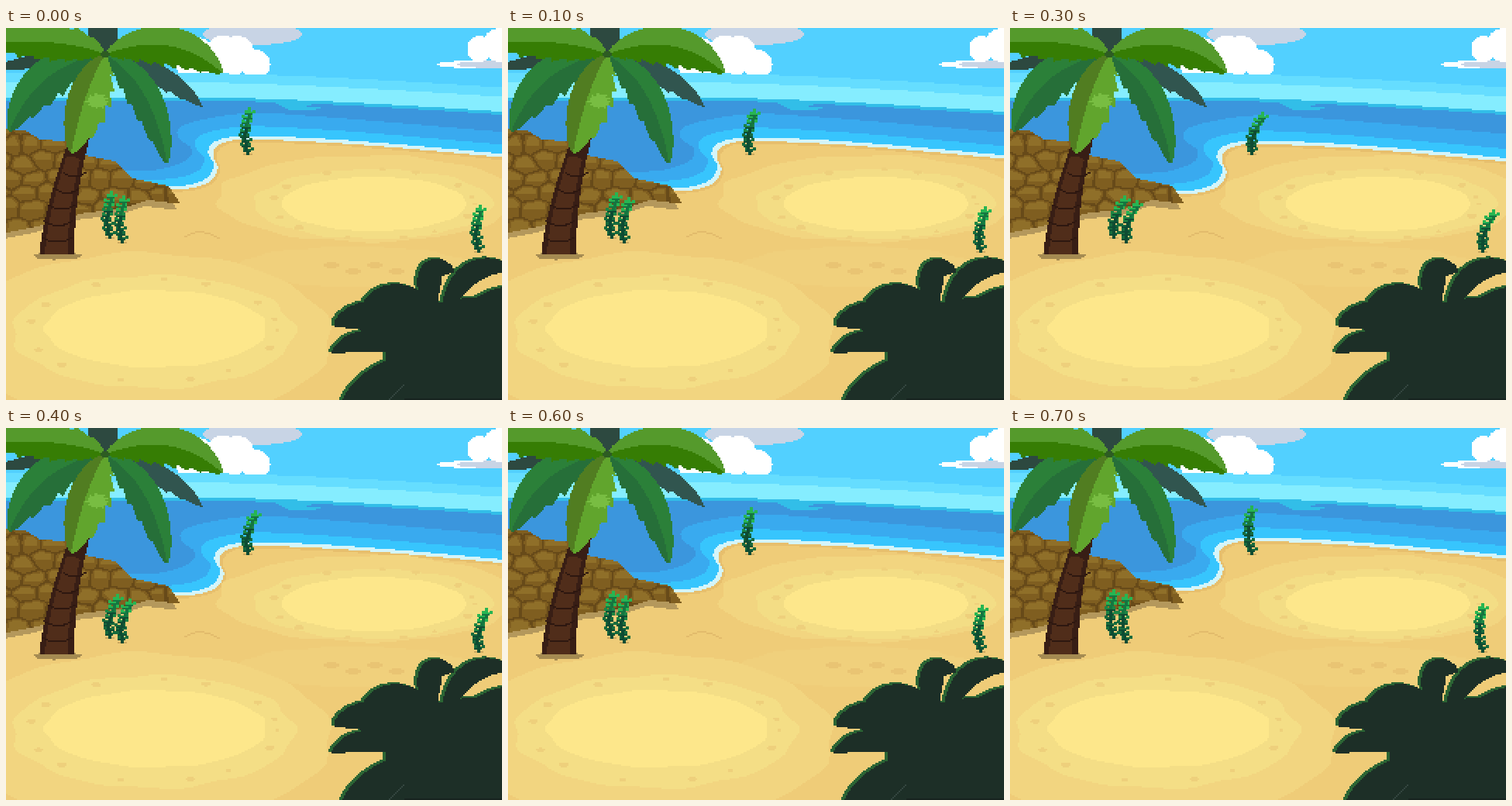
Animation, 640 px wide and 480 px high, one loop 0.8 s. Source, as an HTML page with a canvas:

```html
<!DOCTYPE html>
<html lang="en">
<head>
<meta charset="utf-8">
<title>Beach</title>
<style>
  html, body { margin: 0; height: 100%; overflow: hidden; }
  canvas { display: block; width: 100vw; height: 100vh; image-rendering: pixelated; }
</style>
</head>
<body>
<canvas width="320" height="240"></canvas>
<script>
const W = 320, H = 240;
const screen = document.querySelector('canvas').getContext('2d');
let ctx = screen;

let seed = 7;
const rand = (a, b) => a + (b - a) * ((seed = seed * 16807 % 2147483647) / 2147483647);

function rect(color, x, y, w, h) {
  ctx.fillStyle = color;
  ctx.fillRect(x, y, w, h);
}

// Scanline fill without antialiasing. Shapes use stage units, two per canvas pixel.
// The colour may be a function of the pixel.
function fill(color, p, dx = 0, dy = 0) {
  for (let y = 0; y < H; y++) {
    const cy = y * 2 + 1 - dy, xs = [];
    p.forEach(([x1, y1], i) => {
      const [x2, y2] = p[(i + 1) % p.length];
      if (y1 > cy !== y2 > cy) xs.push(Math.round((x1 + (cy - y1) / (y2 - y1) * (x2 - x1) + dx) / 2));
    });
    xs.sort((a, b) => a - b);
    for (let i = 0; i + 1 < xs.length; i += 2) {
      if (typeof color === 'string') rect(color, xs[i], y, xs[i + 1] - xs[i], 1);
      else for (let x = xs[i]; x < xs[i + 1]; x++) rect(color(x * 2, y * 2), x, y, 1, 1);
    }
  }
}

function smooth(p) {
  const out = [], n = p.length;
  for (let i = 0; i < n; i++) {
    const [a, b, c, d] = [-1, 0, 1, 2].map(k => p[(i + k + n) % n]);
    for (let t = 0; t < 1; t += 0.125) {
      out.push([0, 1].map(k => b[k] + t / 2 * (c[k] - a[k] +
        t * (2 * a[k] - 5 * b[k] + 4 * c[k] - d[k] + t * (3 * (b[k] - c[k]) + d[k] - a[k])))));
    }
  }
  return out;
}

function blob(color, x, y, rx, ry, wobble = 0) {
  const p = [];
  for (let a = 0; a < 2 * Math.PI; a += 0.1) {
    const r = 1 + wobble * (Math.sin(a * 9 + x) + Math.sin(a * 13 + y));
    p.push([x + rx * r * Math.cos(a), y + ry * r * Math.sin(a)]);
  }
  fill(color, p);
}

// A band along a quadratic curve, reaching left(t) and right(t) to its sides
function strip(color, [x0, y0], [x1, y1], [x2, y2], left, right) {
  const a = [], b = [];
  for (let i = 0; i <= 80; i++) {
    const t = i / 80, s = 1 - t;
    const x = s * s * x0 + 2 * s * t * x1 + t * t * x2, y = s * s * y0 + 2 * s * t * y1 + t * t * y2;
    const dx = s * (x1 - x0) + t * (x2 - x1), dy = s * (y1 - y0) + t * (y2 - y1), n = Math.hypot(dx, dy);
    a.push([x + dy / n * left(t), y - dx / n * left(t)]);
    b.unshift([x - dy / n * right(t), y + dx / n * right(t)]);
  }
  fill(color, a.concat(b));
}

const none = () => 0;
const bulge = w => t => w * Math.sin(Math.PI * t) ** 0.65;
const jagged = (w, teeth = 6) => t => bulge(w)(t) * (0.8 + 0.25 * (t * teeth % 1));

function leaf(from, ctrl, tip, leftColor, left, rightColor, right) {
  strip(leftColor, from, ctrl, tip, left, none);
  strip(rightColor, from, ctrl, tip, none, right);
}

function sky() {
  rect('#52d0ff', 0, 0, W, H);
  blob('#c8d4e5', 318, 8, 64, 14);
  blob('#c8d4e5', 312, 67, 94, 5);
  for (const [x, y, r] of [[245, 40, 28], [280, 30, 21], [298, 32, 22], [322, 47, 19], [290, 48, 16]]) blob('#fff', x, y, r, r);
  blob('#fff', 612, 47, 56, 5);
  blob('#c8d4e5', 640, 47, 58, 5);
  blob('#fff', 611, 27, 16, 17);
  blob('#fff', 640, 22, 26, 22);
  for (let x = 0; x < W; x++) {
    const y = 88 + 19 * Math.max(0, (x * 2 - 230) / 410) ** 1.5;
    [['#65ddff', -30], ['#85edff', -18], ['#32bee8', 1], ['#3b96dd', 5]].forEach(([color, d]) =>
      rect(color, x, Math.round((y + d) / 2), 1, H));
  }
  for (let i = 0; i < 5; i++) rect('#32bee8', 174 + i * 2, 48 + i, 14 + i * 7 % 12, 1);
}

// Matching points of the deep water's edge and the sand's edge; the bands lie between
const deep = [[180, 184], [212, 179], [236, 168], [238, 154], [222, 141], [232, 124], [310, 110], [400, 114], [500, 122], [640, 134], [760, 144]];
const dry = [[180, 207], [228, 208], [261, 199], [273, 181], [267, 164], [276, 150], [308, 144], [400, 147], [500, 154], [640, 167], [760, 179]];

function shore(color, q, tide) {
  const edge = deep.map(([x, y], i) => [x + (dry[i][0] - x) * q, y + (dry[i][1] - y) * q]);
  const move = tide * 2 * Math.min(1, 0.5 + q);
  fill(color, smooth([[760, 560], [-80, 560], [-80, edge[0][1]], [100, edge[0][1]], ...edge]), move, move);
}

function sea(tide) {
  shore('#39aaef', 0, tide);
  shore('#37c5fd', 0.5, tide);
  shore('#d4f5fa', 0.86, tide);
  shore('#e7bf6d', 1, tide);
  shore('#efcc78', 1.1, tide);
}

function sand() {
  blob('#f0d07c', 450, 308, 150, 26, 0.02);
  blob('#f2d580', 466, 220, 194, 56, 0.015);
  blob('#f3dd85', 474, 227, 154, 45, 0.015);
  blob('#fde78b', 475, 227, 119, 35, 0.008);
  blob('#f2d580', 180, 400, 240, 110, 0.012);
  blob('#f4de86', 190, 392, 182, 73, 0.015);
  blob('#fde78b', 193, 388, 143, 50, 0.01);
  for (let i = 0; i < 14; i++) {
    const a = i * 2.4, r = rand(3, 7);
    blob('#eed07c', 190 + 160 * Math.cos(a), 390 + 66 * Math.sin(a), r, r / 2);
    blob('#eed07c', 474 + 130 * Math.cos(a), 227 + 45 * Math.sin(a), r, r / 2);
  }
  for (let i = 0; i < 4; i++) blob('#e9c473', 420 + i * 28, 306 + i % 2 * 8, 10, 4);
  strip('#e2bb6c', [230, 269], [252, 255], [275, 271], none, () => 2);
}

function rocks() {
  const stones = [];
  for (let y = 130; y < 270; y += 21) {
    for (let x = -10; x < 240; x += 29) stones.push([x + rand(-9, 9) + y % 2 * 14, y + rand(-6, 6)]);
  }
  const texture = (x, y) => {
    const near = stones.map(([sx, sy]) => [Math.hypot(x - sx, (y - sy) * 1.4), y - sy]).sort((a, b) => a[0] - b[0]);
    const edge = near[1][0] - near[0][0];
    return edge < 3 ? '#674a19' : edge > 8 && near[0][1] < 2 ? '#8f6f29' : '#7f5e20';
  };
  const outline = [[0, 130], [24, 132], [44, 144], [76, 146], [106, 165], [140, 172], [164, 194], [210, 204], [225, 227], [184, 222], [150, 233], [100, 239], [40, 256], [0, 264]];
  fill('#b4985c', outline, -4, 8);
  fill(texture, outline);
}

function trunk() {
  const path = [[66, 292], [70, 190], [133, 40]];
  const width = k => t => k * (23 - 17 * t);
  blob('#a58b52', 66, 294, 31, 5, 0.03);
  strip('#381e15', ...path, width(1), width(1));
  strip('#502d1a', ...path, t => t < 0.55 ? width(0.7)(t) : 0, t => t < 0.55 ? width(0.6)(t) : 0);
  for (let i = 0; i < 5; i++) {
    const x = 66 + i * i * 1.4, y = 272 - i * 21, w = 20 - i * 1.5;
    strip('#2d1710', [x - w, y - 3], [x, y + 9], [x + w, y - 3], none, () => 2);
  }
}

function palm() {
  const crown = [128, 34], slate = '#2d4940', blue = '#31554f';
  const green = '#2b8039', shade = '#266f39', lime = '#559a2c', moss = '#367d04';
  leaf(crown, [60, 36], [-20, 52], slate, jagged(12), slate, bulge(8));
  leaf(crown, [126, 10], [128, -40], slate, bulge(22), slate, bulge(18));
  leaf(crown, [205, 48], [253, 101], blue, bulge(10), blue, jagged(18));
  leaf(crown, [40, 45], [4, 134], shade, jagged(30), green, bulge(24));
  leaf(crown, [190, 70], [208, 175], green, bulge(20), shade, jagged(24));
  leaf(crown, [70, 10], [-40, 20], moss, jagged(24, 8), lime, jagged(26));
  leaf(crown, [215, 0], [279, 58], lime, bulge(25), moss, jagged(28, 8));
  leaf(crown, [98, 85], [84, 162], '#61a52d', jagged(35), '#517d21', bulge(22));
  blob('#78bd42', 118, 94, 13, 9, 0.12);
  blob('#2d5c22', 128, 34, 7, 4);
}

function foliage(color) {
  const frond = (x, y, cx, cy, tx, ty, w) => leaf([x, y], [cx, cy], [tx, ty], color, bulge(w), color, bulge(w));
  frond(540, 420, 460, 384, 416, 418, 14);
  frond(560, 400, 470, 350, 419, 382, 20);
  frond(570, 390, 510, 318, 456, 355, 15);
  frond(550, 380, 525, 290, 575, 312, 16);
  frond(560, 380, 580, 288, 655, 310, 14);
  frond(570, 400, 600, 335, 700, 336, 12);
  blob(color, 600, 430, 115, 84);
  blob(color, 590, 500, 165, 94);
  rect(color, 300, 180, 20, 60);
}

function bush() {
  foliage('#2b6534');
  ctx.translate(2, 1);
  foliage('#1d2f27');
  ctx.translate(-2, -1);
  for (let i = 0; i < 10; i++) rect('#344640', 247 + i, 239 - i, 1, 1);
  rect('#17231f', 257, 239, 63, 1);
}

function plant(x, y, sway) {
  rect('#cba85f', x - 3, y - 1, 6, 1);
  for (let i = 0; i < 9; i++) {
    const u = i / 8, reach = 3 + i % 2;
    const px = Math.round(x - 2 * Math.sin(Math.PI * u) - 0.5 * u + 1.75 * sway * u ** 1.3);
    const py = Math.round(y - 4 - u * (25.5 - sway));
    const light = i < 4 ? '#176b3d' : i < 6 ? '#1c8544' : '#27b552';
    const dark = i < 6 ? '#0e4c33' : '#157540';
    rect(dark, px - 1, py, 2, 4);
    rect(dark, px - 3, py + 1, 5 + i % 2, 1);
    rect(light, px - reach, py - 1, 2, 2);
    rect(light, px - 2, py, 4, 1);
    rect(light, px + 5 - reach, py - 1, 2, 2);
    if (i === 8) rect(light, px - 1, py - 3, 2, 4);
  }
}

function layer(...parts) {
  const canvas = document.createElement('canvas');
  canvas.width = W;
  canvas.height = H;
  ctx = canvas.getContext('2d');
  parts.forEach(part => part());
  ctx = screen;
  return canvas;
}

const back = layer(sky), front = layer(sand, rocks, trunk, palm, bush);

function draw(step) {
  const tide = 4 - Math.abs(4 - step);
  const sway = 4 - Math.abs(4 - (step + 1) % 8);
  ctx.drawImage(back, 0, 0);
  sea(tide);
  ctx.drawImage(front, 0, 0);
  for (const [x, y] of [[156, 82], [67, 136], [75, 139], [305, 145]]) plant(x, y, sway);
}

const start = performance.now();
let shown = -1;
function tick() {
  const step = Math.floor((performance.now() - start) / 100) % 8;
  if (step !== shown) draw(shown = step);
  requestAnimationFrame(tick);
}
tick();
</script>
</body>
</html>
```
